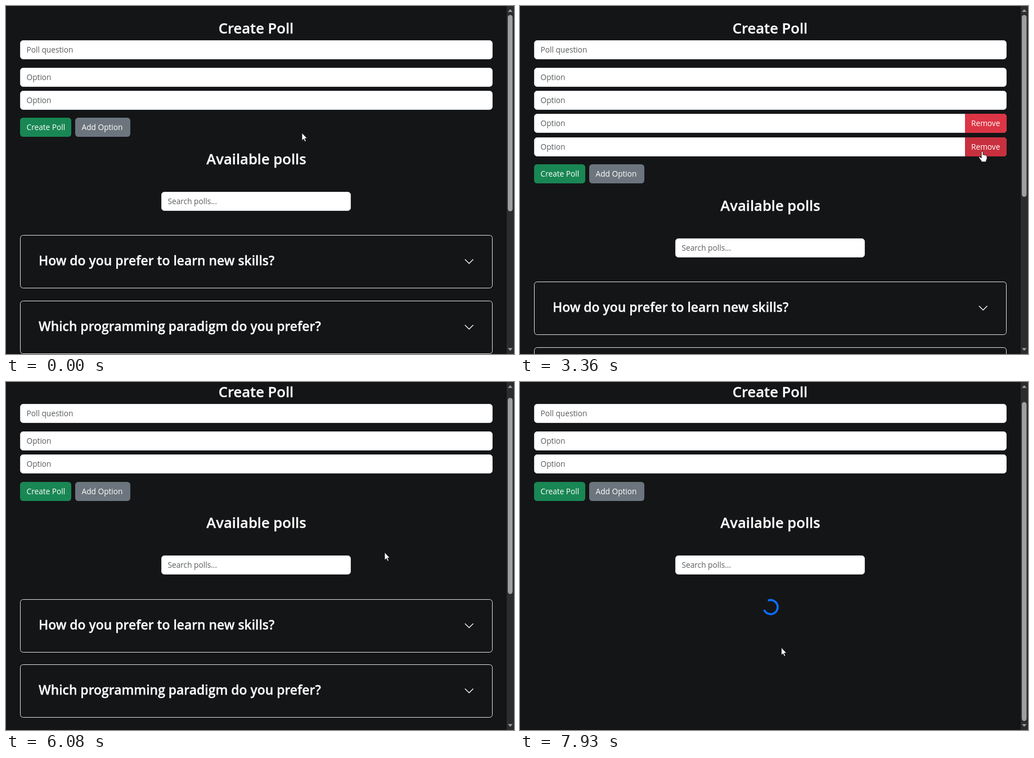
An HTML page that plays this animation: 903 px wide and 620 px high, repeating every 8 s.

```html
<!DOCTYPE html>
<html lang="en">
<head>
<meta charset="utf-8">
<title>Polls</title>
<style>
  html, body { margin: 0; width: 100%; height: 100%; overflow: hidden; background: #141517; }
  svg { display: block; width: 100%; height: 100%; }
  text { font: 400 13.7px "Open Sans", "Noto Sans", sans-serif; fill: #fff; }
  .h2, .h3 { font-weight: 600; stroke: #fff; stroke-width: .3; }
  .h2 { font-size: 25.6px; text-anchor: middle; }
  .h3 { font-size: 22.9px; }
  .hint { fill: #595c5f; }
  .page { font-size: 17px; font-weight: 600; text-anchor: middle; }
  .field { fill: #fff; stroke: #dee2e6; }
  .card { fill: none; stroke: #dee2e6; }
  .line { fill: none; stroke: #fff; stroke-width: 1.3; stroke-linecap: round; stroke-linejoin: round; }
</style>
</head>
<body>
<svg id="stage" viewBox="0 0 903 620"></svg>
<script>
const LOOP = 8000, VIEW = 620, PAGE = 1042.7, LOADING_PAGE = 641.6;
const QUESTION_TOP = 61, OPTION_TOP = 109.6, ROW = 41.3, FIELD_H = 34;
const BUTTON_TOP = 199.2, SEARCH_TOP = 331, CARD_TOP = 408.3, CARD_STEP = 116.8, PAGER_TOP = 992.7;
const LOAD_START = 7510;
const stage = document.getElementById('stage');

function add(parent, tag, attrs = {}, content) {
  const el = document.createElementNS('http://www.w3.org/2000/svg', tag);
  for (const key in attrs) el.setAttribute(key, attrs[key]);
  if (content !== undefined) el.textContent = content;
  parent.appendChild(el);
  return el;
}
const label = (g, x, y, str, cls = '') => add(g, 'text', { x, y, class: cls }, str);
const show = (el, on) => el.setAttribute('display', on ? 'inline' : 'none');
const clamp = v => Math.max(0, Math.min(1, v));

// Each item is a group placed at its own page height.
const items = [];
function item(top, moves = true) {
  const el = add(stage, 'g');
  items.push({ el, top, moves });
  return el;
}

function field(g, x, w, hint) {
  add(g, 'rect', { x: x + .5, y: .5, width: w - 1, height: FIELD_H - 1, rx: 5, class: 'field' });
  label(g, x + 11.5, 22, hint, 'hint');
}
function button(g, x, w, fill, str) {
  const box = add(g, 'rect', { x, y: 0, width: w, height: FIELD_H, rx: 5.4, fill });
  label(g, x + 11.5, 22.3, str);
  return box;
}

label(item(48.6, false), 444.5, 0, 'Create Poll', 'h2');
field(item(QUESTION_TOP, false), 25, 840, 'Poll question');

const removeBoxes = [];
const options = [0, 1, 2, 3].map(i => {
  const g = item(OPTION_TOP + ROW * i, false);
  field(g, 25, 840, 'Option');
  if (i > 1) {
    removeBoxes[i] = add(g, 'path', { d: 'M791 0h68.6a5.4 5.4 0 0 1 5.4 5.4v23.2a5.4 5.4 0 0 1-5.4 5.4H791z' });
    label(g, 802, 22.3, 'Remove');
  }
  return g;
});

const buttons = item(BUTTON_TOP);
button(buttons, 25, 91, '#198754', 'Create Poll');
const addBox = button(buttons, 123, 98, '#6c757d', 'Add Option');

label(item(282), 445, 0, 'Available polls', 'h2');
field(item(SEARCH_TOP), 276, 337, 'Search polls...');

const list = [
  'How do you prefer to learn new skills?',
  'Which programming paradigm do you prefer?',
  'Which social media platform do you use the most?',
  'Which pet do you like the most?',
  'What’s your preferred working hours?'
].map((question, i) => {
  const g = item(CARD_TOP + CARD_STEP * i);
  add(g, 'rect', { x: 25.5, y: .5, width: 839, height: 94, rx: 5, class: 'card' });
  label(g, 58, 54, question, 'h3');
  add(g, 'path', { d: 'M816.2 43.8l7 7 7-7', class: 'line' });
  return g;
});

const pager = item(PAGER_TOP);
list.push(pager);
const pageBox = add(pager, 'rect', { x: 418, y: 1, width: 53, height: 48 });
add(pager, 'rect', { x: 363.5, y: .5, width: 162, height: 49, rx: 6, fill: 'none', stroke: '#5a5f65' });
add(pager, 'path', { d: 'M471.5 .5v49', stroke: '#858a90' });
add(pager, 'path', { d: 'M417.5 .5H369.5a6 6 0 0 0-6 6v37a6 6 0 0 0 6 6h48z', fill: 'none', stroke: '#1658bc' });
[391, 445, 498].forEach((x, i) => label(pager, x, 32, i + 1, 'page'));

// A ring with its right quarter missing.
const spinner = item(CARD_TOP + 14.4);
const ring = add(spinner, 'path', {
  d: 'M8.91 8.91A12.6 12.6 0 1 1 8.91-8.91', fill: 'none', stroke: '#0d6efd', 'stroke-width': 3.6
});

add(stage, 'rect', { x: 890, y: 0, width: 13, height: VIEW, fill: '#2c2c2c' });
add(stage, 'path', { d: 'M892 10.5l4.3-4.8 4.3 4.8zM892 609.5l4.3 4.8 4.3-4.8z', fill: '#9f9f9f' });
const thumb = add(stage, 'rect', { x: 892, width: 8.5, rx: 4.2, fill: '#9f9f9f' });

const pointer = add(stage, 'g');
const solid = { fill: '#fff', stroke: '#000', 'stroke-width': .8, 'stroke-linejoin': 'round' };
const shapes = {
  arrow: add(pointer, 'path', { d: 'M0 0V13.8L3.1 10.9 5.2 15.7 7.4 14.8 5.3 10H9.4Z', ...solid }),
  hand: add(pointer, 'path', {
    d: 'M-1.5 1.2Q0-.8 1.5 1.2V6.6L3 6.1 4.3 7 6 6.8 7 7.8 8.5 8.4V13.5L7 17V19H-1.5V17.2L-6 11.5Q-6.3 9.2-4 10.2L-1.5 12Z', ...solid
  }),
  beam: add(pointer, 'path', {
    d: 'M-3-7.5H-1L0-6.5 1-7.5H3M0-6.5V6.5M-3 7.5H-1L0 6.5 1 7.5H3', fill: 'none', stroke: '#111', 'stroke-width': 1.2
  })
};

// Monotone cubic through [time, value...] keys: smooth, without overshoot.
function track(keys, t, k) {
  const last = keys.length - 1;
  if (t <= keys[0][0]) return keys[0][k];
  if (t >= keys[last][0]) return keys[last][k];
  const slope = j => j < 0 || j >= last ? 0 : (keys[j + 1][k] - keys[j][k]) / (keys[j + 1][0] - keys[j][0]);
  const tangent = j => {
    const a = slope(j - 1), b = slope(j);
    return a * b > 0 ? 2 * a * b / (a + b) : 0;
  };
  let i = 0;
  while (keys[i + 1][0] <= t) i++;
  const [a, b] = [keys[i], keys[i + 1]];
  const d = b[0] - a[0], u = (t - a[0]) / d, v = 1 - u;
  return a[k] * (1 + 2 * u) * v * v + tangent(i) * d * u * v * v
    + b[k] * u * u * (3 - 2 * u) - tangent(i + 1) * d * u * u * v;
}

const path = [
  [70, 526, 226], [450, 440, 104], [870, 343, 281], [1500, 193, 223],
  [1700, 194, 224], [1770, 194, 225], [2200, 213, 264], [2390, 213, 264],
  [2600, 258, 310], [2950, 520, 345], [3340, 820, 258], [3430, 824, 263],
  [3780, 824, 263], [4120, 823, 219.5], [4800, 823, 219.5], [5350, 618, 310],
  [5680, 673, 303.5], [6080, 673, 303.5], [6490, 673, 308], [6640, 673, 308],
  [7320, 446, 596], [7440, 445, 600], [7500, 445, 600], [7930, 464.5, 473]
];
const wheel = [[6080, 21.6], [6150, 78], [6290, 232], [6420, 376], [6490, 422.7]];

function optionCount(t) {
  if (t < 1700 || t >= 4260) return 2;
  return t >= 2320 && t < 3570 ? 4 : 3;
}
function scrollAt(t) {
  if (t < 6080) return 0;
  return t < LOAD_START ? track(wheel, t, 1) : LOADING_PAGE - VIEW;
}

function cursorKind(x, y, count, loading) {
  const shift = ROW * (count - 2);
  const inside = (left, top, right, height = FIELD_H) => x >= left && x <= right && y >= top && y <= top + height;
  for (let i = 0; i < count; i++) {
    if (inside(25, OPTION_TOP + ROW * i, 865)) return i > 1 && x >= 791 ? 'hand' : 'beam';
  }
  if (inside(25, QUESTION_TOP, 865) || inside(276, SEARCH_TOP + shift, 613)) return 'beam';
  if (inside(25, BUTTON_TOP + shift, 116) || inside(123, BUTTON_TOP + shift, 221)) return 'hand';
  return !loading && inside(363, PAGER_TOP + shift, 526, 50) ? 'hand' : 'arrow';
}

const fade = (t, on, off) => clamp((t - on) / 150) - clamp((t - off) / 150);
function mix(from, to, k) {
  return `rgb(${from.map((c, i) => Math.round(c + (to[i] - c) * k))})`;
}
const paintRemove = (box, k) => box.setAttribute('fill', mix([220, 53, 69], [187, 45, 59], k));

function draw(t) {
  const count = optionCount(t), shift = ROW * (count - 2);
  const scroll = scrollAt(t), loading = t >= LOAD_START;

  for (const { el, top, moves } of items) {
    el.setAttribute('transform', `translate(0 ${Math.round(top + (moves ? shift : 0) - scroll)})`);
  }
  options.forEach((el, i) => show(el, i < count));
  list.forEach(el => show(el, !loading));
  show(spinner, loading);
  ring.setAttribute('transform', `translate(445.5 0) rotate(${(t - LOAD_START) / 750 * 360})`);

  const addHover = fade(t, 1400, 1720) + fade(t, 1950, 2390);
  addBox.setAttribute('fill', mix([108, 117, 125], [92, 99, 106], clamp(addHover)));
  paintRemove(removeBoxes[2], fade(t, 4060, 4260));
  paintRemove(removeBoxes[3], fade(t, 3270, 3570));
  pageBox.setAttribute('fill', mix([20, 21, 23], [43, 48, 53], fade(t, 7250, LOAD_START)));

  const scale = 588 / (loading ? LOADING_PAGE : PAGE + shift);
  thumb.setAttribute('y', 16 + scroll * scale);
  thumb.setAttribute('height', VIEW * scale);

  const x = track(path, t, 1), y = track(path, t, 2);
  const kind = cursorKind(x, y + scroll, count, loading);
  for (const name in shapes) show(shapes[name], name === kind);
  pointer.setAttribute('transform', `translate(${x} ${y})`);
}

const start = performance.now();
function frame() {
  draw((performance.now() - start) % LOOP);
  requestAnimationFrame(frame);
}
frame();
</script>
</body>
</html>
```
